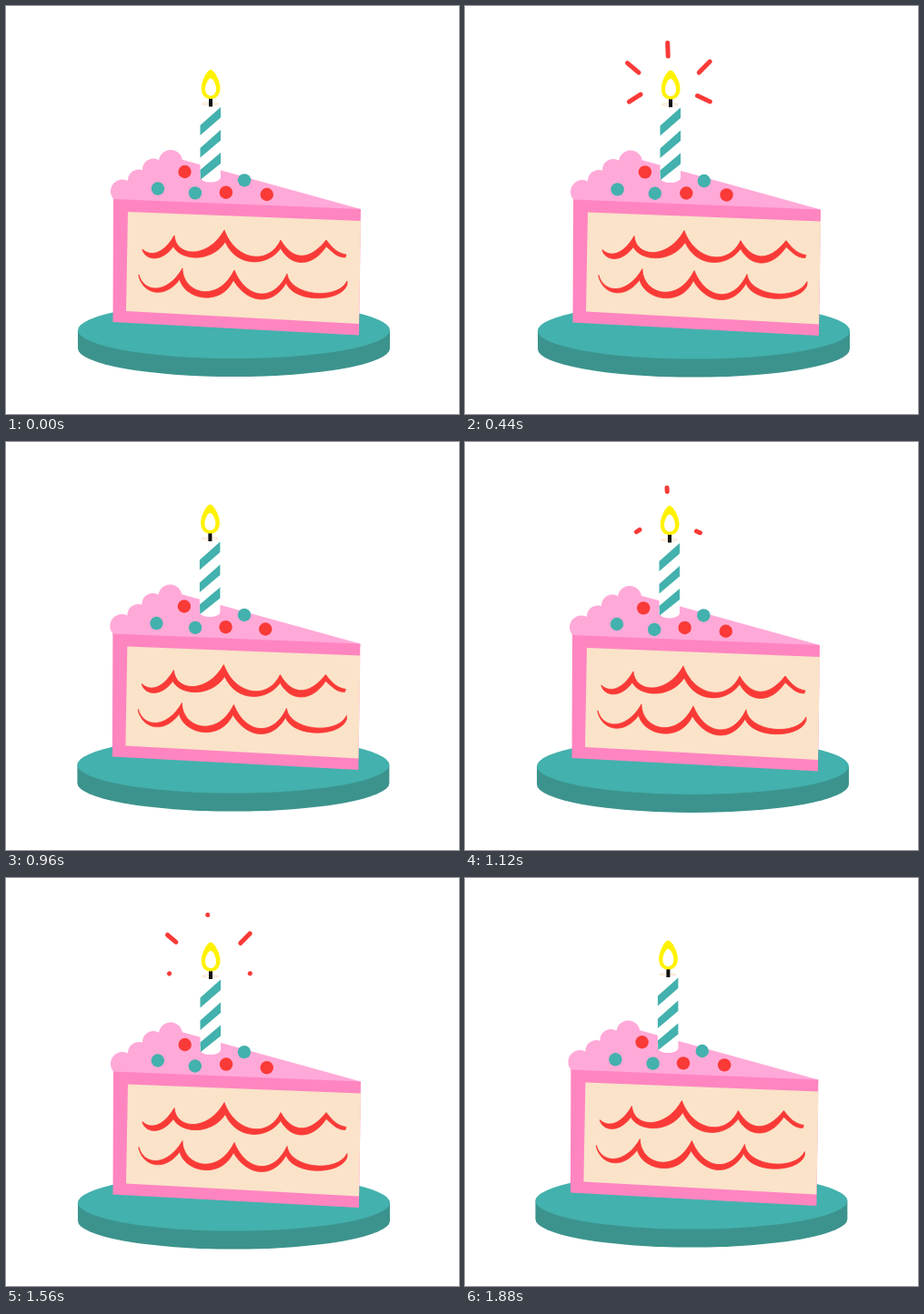
These frames come from a looping animation (498 px wide and 448 px high, 1.92 s). An HTML page:

```html
<!DOCTYPE html>
<html lang="en">
<head>
<meta charset="utf-8">
<title>Birthday cake</title>
<style>
html, body { margin: 0; width: 100%; height: 100%; overflow: hidden; background: #fff; }
svg { display: block; width: 498px; height: 448px; }
</style>
</head>
<body>
<svg viewBox="0 0 498 448">
  <g id="scene">
    <path fill="#3c938d" d="M79 356V376A171.5 31 0 0 0 422 376V356Z"/>
    <ellipse fill="#43b1ad" cx="250.5" cy="356" rx="171.5" ry="31"/>
    <g fill="#ffa9d8">
      <circle cx="128" cy="203.5" r="13"/>
      <circle cx="146" cy="191.5" r="12"/>
      <circle cx="162" cy="179.5" r="12"/>
      <circle cx="181" cy="171" r="13"/>
      <path d="M118 213V206L150 184L181 165L193 168.5L390 223V226Z"/>
    </g>
    <path fill="#ff85c0" d="M118 212L390 223L388 361.5L117.5 347Z"/>
    <path fill="#fae3c9" d="M134 226L390 236L388 349L132 335Z"/>
    <g fill="#f93a37" stroke="#f93a37" stroke-width=".8" stroke-linejoin="round">
      <path d="M150 267C158 275 172 274 185 252C187 276 222 278 240 246C252 279 288 286 302 257C314 278 332 282 352 257C360 267 364 271 374 273L373 276C364 276 360 271 352 264C338 286 314 288 302 266C288 286 254 288 241 259C226 282 192 280 184 264C172 281 154 280 150 268Z"/>
      <path d="M146 295C152 316 178 316 194 288C194 315 232 328 251 290C264 322 294 326 309 294C312 318 364 324 375 302L375 306C368 326 316 326 308 304C294 329 266 328 250 301C236 331 196 322 191 300C176 321 152 318 146 297Z"/>
    </g>
    <path fill="#fff" d="M213.5 108H236V188A11.25 5.5 0 0 1 213.5 188Z"/>
    <path fill="#43b1ad" d="M236 111V122.5L213.5 142V131ZM236 136V147.5L213.5 166.5V156ZM236 161V173L214 190.5L213.5 180Z"/>
    <ellipse cx="224.5" cy="107.5" rx="9" ry="1.2" fill="#fff" stroke="#fae3c9"/>
    <path fill="#111" d="M223 100H227V110.5H223Z"/>
    <path fill="#fff200" d="M225 70C229 70 236 83 235.5 91C235 99 230 102 225 102S215 99 214.8 91C214.5 83 221 70 225 70Z"/>
    <path fill="#fff" d="M225 79.5C228 79.5 231 87 231 91C231 96 228 98.5 225 98.5S219 96 219 91C219 87 222 79.5 225 79.5Z"/>
    <g id="sprinkles"></g>
    <g id="rays" stroke="#f93a37" stroke-width="5" stroke-linecap="round"></g>
  </g>
</svg>
<script>
const LOOP = 1920, STEP = 40, BURST = 960;
const TEAL = '#43b1ad', RED = '#f93a37';
const byId = id => document.getElementById(id);

function add(parent, tag, attrs) {
  const node = document.createElementNS('http://www.w3.org/2000/svg', tag);
  for (const name in attrs) node.setAttribute(name, attrs[name]);
  return byId(parent).appendChild(node);
}

// Drift of the whole drawing: time, x, y
const drift = [
  [0, 0, 0], [240, .6, 2.4], [440, 1, .6], [600, 0, 1], [760, -1.5, 1.2],
  [960, -.6, -1.5], [1140, 0, 0], [1320, -.6, -.5], [1560, 0, .5],
  [1720, -.8, .8], [1880, -1.6, -1.5], [1920, 0, 0]
];

const sprinkles = [
  [196.5, 182, RED], [166.5, 200.5, TEAL], [208.3, 205.5, TEAL],
  [242, 204.5, RED], [286.3, 207.3, RED], [262.3, 191, TEAL]
].map(([x, y, fill]) => ({ x, y, node: add('sprinkles', 'circle', { r: 7.2, fill }) }));

// Inner end, outer end, growth start, shrink start
const rays = [
  [222.2, 54.5, 221.7, 40, 120, 470],
  [192, 96.5, 179.5, 104.5, 120, 470],
  [254.5, 98, 268.3, 104.3, 120, 470],
  [190, 72.5, 177.5, 62, 200, 570],
  [256.3, 72.5, 268.2, 60.5, 200, 585]
].map(([x1, y1, x2, y2, grow, shrink]) =>
  ({ x1, y1, x2, y2, grow, shrink, node: add('rays', 'line', {}) }));

const clamp = v => Math.min(1, Math.max(0, v));
const mix = (a, b, k) => a + (b - a) * k;

function driftAt(t) {
  const i = drift.findIndex(key => key[0] > t);
  const [a, b] = [drift[i - 1], drift[i]];
  const k = (1 - Math.cos(Math.PI * (t - a[0]) / (b[0] - a[0]))) / 2;
  return [mix(a[1], b[1], k), mix(a[2], b[2], k)];
}

function drawRay(ray, t) {
  const { node, x1, y1, x2, y2, grow, shrink } = ray;
  const head = clamp((t - grow) / 140);
  const tail = clamp((t - shrink) / 120);
  node.setAttribute('visibility', t >= grow && t < shrink + 135 ? 'visible' : 'hidden');
  node.setAttribute('x1', mix(x1, x2, Math.min(tail, .995)));
  node.setAttribute('y1', mix(y1, y2, Math.min(tail, .995)));
  node.setAttribute('x2', mix(x1, x2, head));
  node.setAttribute('y2', mix(y1, y2, head));
}

function render(now) {
  const t = Math.floor(now % LOOP / STEP) * STEP;
  const phase = t / LOOP * 2 * Math.PI;
  byId('scene').setAttribute('transform', `translate(${driftAt(t)})`);
  sprinkles.forEach(({ x, y, node }, i) => {
    node.setAttribute('cx', x + .5 * Math.sin(phase * 5 + i * 2));
    node.setAttribute('cy', y + .5 * Math.sin(phase * 4 + i * 3));
  });
  rays.forEach(ray => drawRay(ray, t % BURST));
}

const start = performance.now();
function tick() {
  render(performance.now() - start);
  requestAnimationFrame(tick);
}
tick();
</script>
</body>
</html>
```
